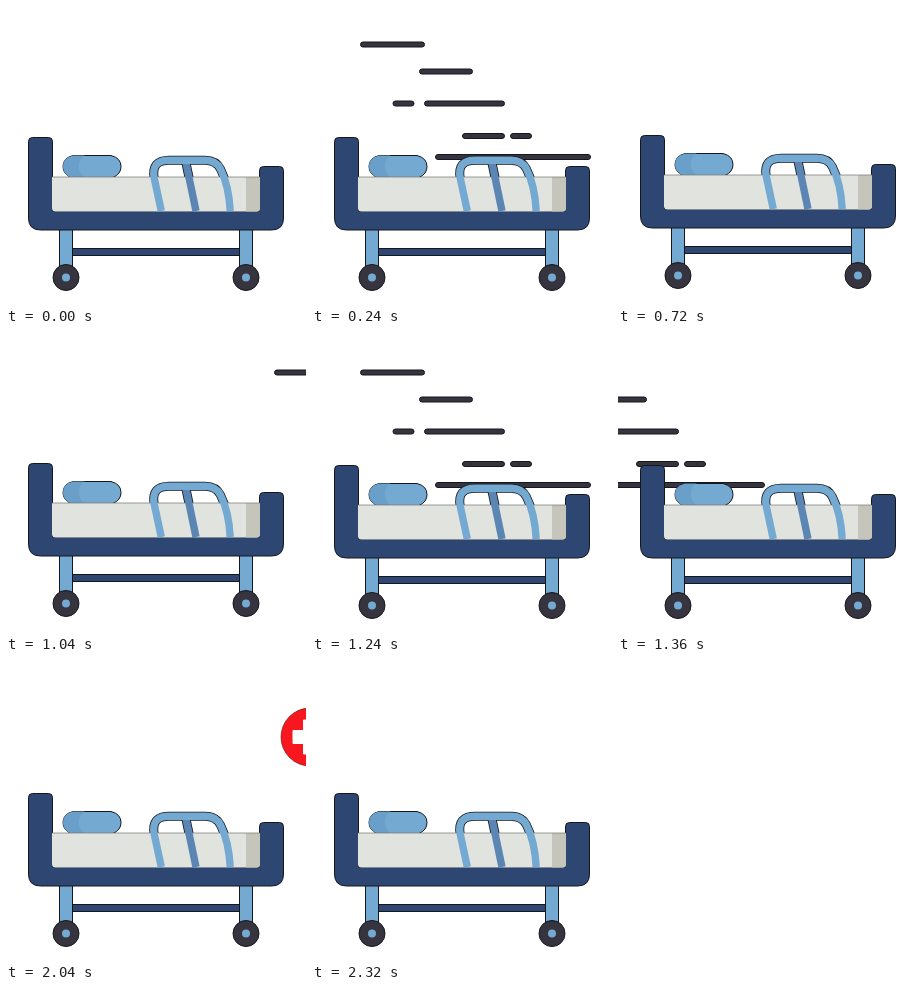
Animation of 300x300 px, one loop 3040 ms. Source, as an HTML page:

```html
<!DOCTYPE html>
<html lang="en">
<head>
<meta charset="utf-8">
<title>Hospital bed</title>
<style>
  html, body { margin: 0; width: 100%; height: 100%; overflow: hidden; background: #fff; }
  svg { display: block; width: 100%; height: 100%; }
  .navy { fill: #2e4772; }
  .blue { fill: #74a9d2; }
  .dark { fill: #35343f; }
  .edge { stroke: #15171d; stroke-width: 1; }
  .rail { fill: none; stroke: #74a9d2; stroke-width: 7.4; }
  .bar { fill: none; stroke: #5b86b4; stroke-width: 7.4; }
  .rim { fill: none; stroke: #15171d; stroke-width: 9; }
</style>
</head>
<body>
<svg viewBox="0 0 300 300">
  <defs>
    <path id="hoop" d="M155.3 205 L148.2 172 Q145 154.300 163 154.300 H199 Q210 154.300 214.500 163 Q223 180 224.200 205"/>
    <path id="mid" d="M180 157 L190 205"/>
    <clipPath id="pillowClip"><path d="M67 149.500 H105 Q115 152 115 160.500 Q115 168 107 171.500 H65 Q57 168 57 160.500 Q57 152 67 149.500Z"/></clipPath>
  </defs>

  <g id="lines" class="dark edge"></g>

  <g id="cross">
    <circle r="29" fill="#f9171f" stroke="#5c0b10" stroke-width=".6"/>
    <path d="M-6.500 -17 H6.500 V-6.500 H17 V6.500 H6.500 V17 H-6.500 V6.500 H-17 V-6.500 H-6.500Z"
          fill="#fff" stroke="#fff" stroke-width="1" stroke-linejoin="round"/>
  </g>

  <g id="bed">
    <rect class="navy edge" x="66" y="242.500" width="168" height="7"/>
    <g class="blue edge">
      <rect x="53.500" y="220" width="13" height="46"/>
      <rect x="233.500" y="220" width="13" height="46"/>
    </g>
    <g class="dark edge">
      <circle cx="60" cy="271.500" r="13"/>
      <circle cx="240" cy="271.500" r="13"/>
    </g>
    <g class="blue">
      <circle cx="60" cy="271.500" r="4"/>
      <circle cx="240" cy="271.500" r="4"/>
    </g>
    <path class="navy edge" d="M22.500 135.500 Q22.500 131.500 26.500 131.500 H42.500 Q46.500 131.500 46.500 135.500 V205 H253.500 V164.500 Q253.500 160.500 257.500 160.500 H273.500 Q277.500 160.500 277.500 164.500 V212 Q277.500 224 265.500 224 H34.500 Q22.500 224 22.500 212Z"/>
    <path class="edge blue" d="M67 149.500 H105 Q115 152 115 160.500 Q115 168 107 171.500 H65 Q57 168 57 160.500 Q57 152 67 149.500Z"/>
    <path d="M56 149 H79 Q73 152 73 160.500 Q73 168 80 172 H56Z" fill="#6a9fc9" clip-path="url(#pillowClip)"/>
    <use href="#mid" class="rim"/>
    <use href="#hoop" class="rim"/>
    <path d="M46 171 H254 V202 Q254 205.500 250.500 205.500 H49.500 Q46 205.500 46 202Z" fill="#e1e3de"/>
    <path d="M240 171 H254 V202 Q254 205.500 250.500 205.500 H240Z" fill="#c6c5bc"/>
    <path d="M46 171 H254" stroke="#73756f" stroke-width=".7"/>
    <use href="#mid" class="bar"/>
    <use href="#hoop" class="rail"/>
  </g>
</svg>
<script>
const LOOP = 3040, TICK = 40;
const LINE_STEP = 44, CROSS_STEP = 48;
const lineStarts = [40, 1040], lineTicks = 12;
const crossStart = 2040, crossTicks = 7;
const hopStarts = [640, 1040], hop = [-2, -4, -2];

// x, y, length at the moment the first streak enters
const streaks = [
  [268, 38.5, 65], [327, 65.5, 54],
  [300.5, 97.5, 22], [332, 97.5, 81],
  [370, 130, 43], [418, 130, 22],
  [343, 151, 156]
];

const get = id => document.getElementById(id);
const lines = get("lines"), cross = get("cross"), bed = get("bed");

for (const [x, y, w] of streaks) {
  const r = document.createElementNS("http://www.w3.org/2000/svg", "rect");
  const box = { x: x + 0.5, y: y - 2.5, width: w - 1, height: 5, rx: 2.5 };
  for (const k in box) r.setAttribute(k, box[k]);
  lines.append(r);
}

const move = (el, x, y) => el.setAttribute("transform", `translate(${x} ${y})`);
const show = (el, on) => el.setAttribute("visibility", on ? "visible" : "hidden");
const ticksSince = (t, start) => Math.floor((t - start) / TICK);

function draw(t) {
  const run = lineStarts.map(s => ticksSince(t, s)).find(n => n >= 0 && n < lineTicks);
  show(lines, run !== undefined);
  if (run !== undefined) move(lines, -run * LINE_STEP, 0);

  const n = ticksSince(t, crossStart);
  show(cross, n >= 0 && n < crossTicks);
  move(cross, 304 - n * CROSS_STEP, 75);

  const lift = hopStarts.reduce((sum, s) => sum + (hop[ticksSince(t, s)] || 0), 0);
  move(bed, 0, lift);
}

const begin = performance.now();
function frame() {
  draw((performance.now() - begin) % LOOP);
  requestAnimationFrame(frame);
}
frame();
</script>
</body>
</html>
```
